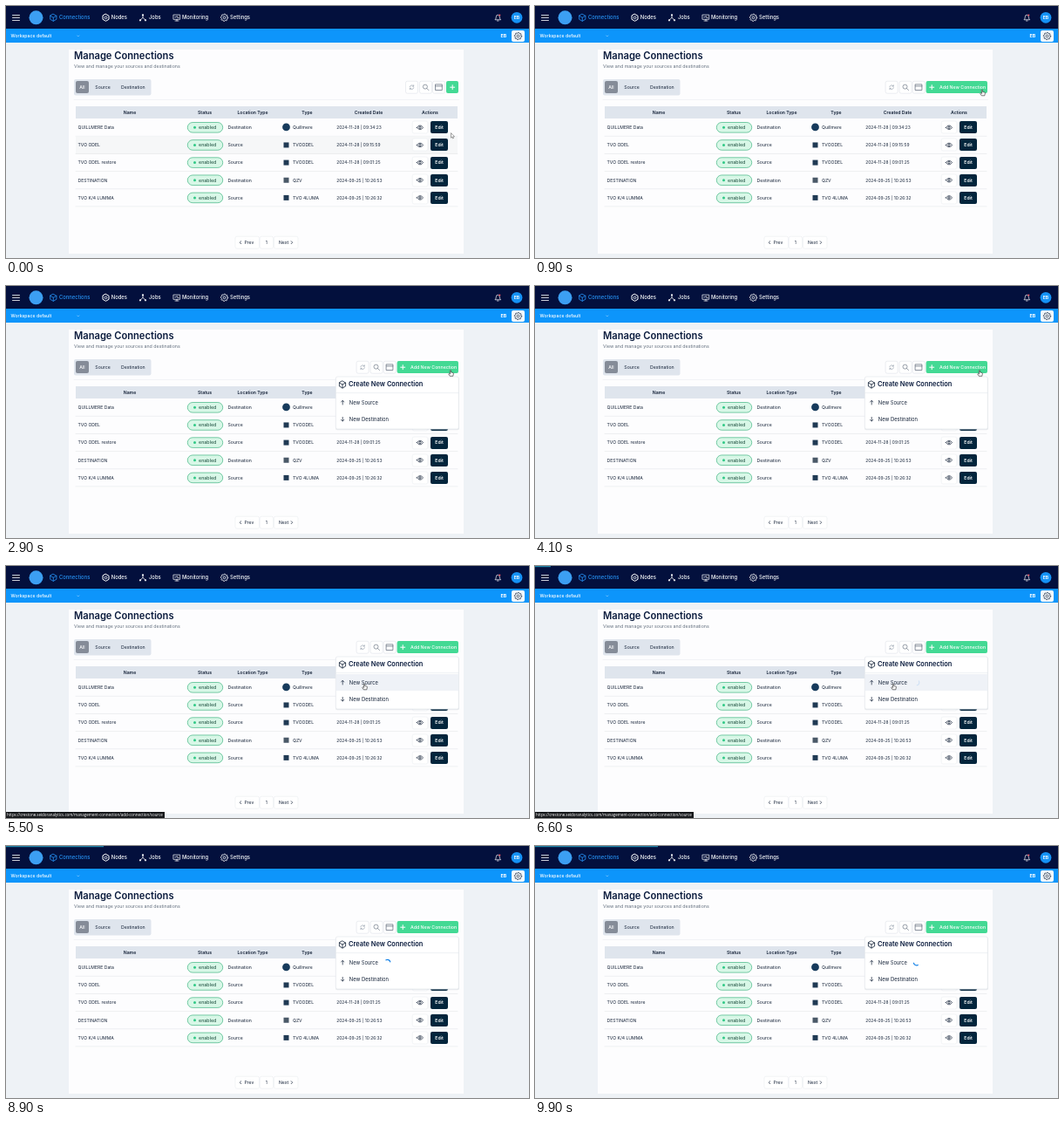
Recreate the animation shown at these times as an HTML page. Size 600 by 289 pixels, loop 10 s.

```html
<!DOCTYPE html>
<html lang="en">
<head>
<meta charset="utf-8">
<title>Manage Connections</title>
<style>
  html, body { margin: 0; width: 100%; height: 100%; overflow: hidden; background: #eef2f6; }
  svg { display: block; width: 100vw; height: 100vh; font-family: Inter, "Open Sans", sans-serif; }
</style>
</head>
<body>
<svg id="stage" viewBox="0 0 600 289"></svg>
<script>
const LOOP = 10000, STEP = 100;
const NAVY = '#03103d', INK = '#142238', GREEN = '#43d994';

const text = (x, y, str, size = 5.2, fill = INK, weight = 400, anchor = 'start') =>
  `<text x="${x}" y="${y}" font-size="${size}" fill="${fill}" font-weight="${weight}" text-anchor="${anchor}">${str}</text>`;
const box = (x, y, w, h, fill, r = 0, stroke = 'none', extra = '') =>
  `<rect x="${x}" y="${y}" width="${w}" height="${h}" rx="${r}" fill="${fill}" stroke="${stroke}" stroke-width=".7" ${extra}/>`;
const path = (d, stroke = INK, width = .8, fill = 'none') =>
  `<path d="${d}" stroke="${stroke}" stroke-width="${width}" fill="${fill}" stroke-linecap="round" stroke-linejoin="round"/>`;
const dot = (x, y, r, fill, stroke = 'none', width = .8) =>
  `<circle cx="${x}" cy="${y}" r="${r}" fill="${fill}" stroke="${stroke}" stroke-width="${width}"/>`;
const group = (content, attrs = '') => `<g ${attrs}>${content}</g>`;
const at = (x, y, content) => group(content, `transform="translate(${x} ${y})"`);

const cube = color => path('M0-4 3.6-2V2L0 4-3.6 2V-2ZM-3.6-2 0 0 3.6-2M0 0V4', color);
const gear = color => {
  let d = '';
  for (let i = 0; i < 32; i++) {
    const angle = i * Math.PI / 16, r = i % 4 < 2 ? 4.2 : 3.3;
    d += `${i ? 'L' : 'M'}${(r * Math.cos(angle)).toFixed(2)} ${(r * Math.sin(angle)).toFixed(2)}`;
  }
  return path(d + 'Z', color) + dot(0, 0, 1.4, 'none', color);
};
const hexNut = color => path('M0-4 3.5-2V2L0 4-3.5 2V-2Z', color, 1) + dot(0, 0, 1.4, 'none', color);
const branch = color => path('M0-2V0L-3 3M0 0 3 3', color) +
  [[0, -3], [-3, 3], [3, 3]].map(([x, y]) => dot(x, y, 1.1, color)).join('');
const monitor = color => path('M-3.7-3.2H3.7V2H-3.7ZM-2 3.7H2M0 2V3.7M-2.2-.5H-1L0-1.7 1 .3H2.2', color, .7);
const windowIcon = path('M-3.7-3.3H3.7V3.3H-3.7ZM-3.7-1.3H3.7', '#566273', .7);
const search = dot(-.6, -.6, 2.5, 'none', '#6b7684', .7) + path('M1.3 1.3 3.4 3.4', '#6b7684', .7);
const refresh = path('M-2.3-.5A2.4 2.4 0 0 1 2-1.3M2.2-2.5V-1.1H.8M2.3.5A2.4 2.4 0 0 1-2 1.3M-2.2 2.5V1.1H-.8', '#9aa4b1', .7);
const eye = path('M-3.6 0Q0-4.8 3.6 0Q0 4.8-3.6 0Z', INK, .7) + dot(0, 0, 1.2, 'none', INK, .8);
const plus = path('M-2.5 0H2.5M0-2.5V2.5', '#fff', 1);

function navigation() {
  const items = [
    [54.3, 61, 'Connections', cube, '#2794f6'], [114.5, 120.8, 'Nodes', hexNut, '#fff'],
    [157, 164, 'Jobs', branch, '#fff'], [196, 202, 'Monitoring', monitor, '#fff'],
    [250.5, 257, 'Settings', gear, '#fff']
  ];
  return box(0, 0, 600, 26, NAVY) + path('M7.5 10.5H15.5M7.5 13.5H15.5M7.5 16.5H15.5', '#fff', .8) +
    dot(34.5, 13.3, 8, '#3c9ff2') +
    items.map(([ix, tx, label, icon, color]) => at(ix, 13.3, icon(color)) + text(tx, 15.4, label, 5.85, color, 500)).join('') +
    path('M561.3 15.5Q562.3 14.5 562.3 12.5A2 2.3 0 0 1 566.3 12.5Q566.3 14.5 567.3 15.5ZM563.5 17H565.1', '#fff', .7) +
    dot(566.3, 10.5, 1.1, '#f0525f') +
    dot(586, 13.3, 6.4, '#1592f5') + text(586, 15.2, 'EB', 5.2, '#fff', 600, 'middle') +
    box(0, 26, 600, 16, '#0d95fb') + text(5.5, 36.2, 'Workspace default', 5.2, '#fff', 500) +
    path('M81.7 33.9 82.8 35 83.9 33.9', '#a9d8ff', .6) +
    text(571, 36.3, 'EB', 5.4, '#fff', 700, 'middle') +
    box(580, 28, 15, 13, '#f4f8fc', 2) + at(587.5, 34.5, gear('#26344a'));
}

function tableRow([name, place, type, date, mark], i) {
  const y = 139.3 + i * 20.15, base = y + 1.8, top = Math.round(y - 7);
  const logo = i ? box(318.5, y - 3, 6, 6, mark) : dot(321.5, y - .4, 4.4, mark);
  return (i === 1 ? box(80, y - 10, 438, 20.1, '#f6f7f8', 0, 'none', 'id="rowHover"') : '') +
    text(82.5, base, name, 5.1) +
    box(208.3, y - 5.8, 40.4, 11.6, '#d8f7e7', 5.8, '#3fb582') + dot(216.5, y, 1.5, '#2fc985') +
    text(221, base, 'enabled', 5.4, '#17493a') +
    text(254.5, base, place, 5.15) + logo + text(329, base - (i ? 0 : .6), type, 5.1) +
    text(379.3, base, date, 4.85) +
    box(466.2, top, 17.6, 14, '#fff', 2, '#edf0f3') + at(475, y, eye) +
    box(487, top, 20, 14, '#03253c', 2) + text(497, base, 'Edit', 5.1, '#fff', 600, 'middle') +
    path(`M80 ${y + 10}H518`, '#e3e6ea', .6);
}

function table() {
  const heads = [[142, 'Name'], [228, 'Status'], [283, 'Location Type'], [345.5, 'Type'], [416, 'Created Date'], [486.5, 'Actions']];
  const rows = [
    ['QUILLMERE Data', 'Destination', 'Quillmere', '2024-11-28 | 09:34:23', '#173b5c'],
    ['TVO ODEL', 'Source', 'TVOODEL', '2024-11-28 | 09:15:59', '#203a54'],
    ['TVO ODEL restore', 'Source', 'TVOODEL', '2024-11-28 | 09:01:25', '#203a54'],
    ['DESTINATION', 'Destination', 'QZV', '2024-09-25 | 10:26:53', '#4a5968'],
    ['TVO K/4 LUMMA', 'Source', 'TVO 4LUMA', '2024-09-25 | 10:26:32', '#203a54']
  ];
  return box(80, 115, 438, 14, '#dfe5ed') +
    heads.map(([x, label]) => text(x, 123.6, label, 5.15, INK, 600, 'middle')).join('') +
    rows.map(tableRow).join('');
}

function panel() {
  const pages = [[263, 27.5], [291.3, 15.2], [307.5, 27.5]];
  return box(72, 50, 453, 234, '#fdfdfe') +
    text(78, 61.4, 'Manage Connections', 11.15, '#0a1b3d', 600) +
    text(78, 71, 'View and manage your sources and destinations', 5.32, '#64707f') +
    box(78, 84, 88.5, 18.5, '#dfe5ed', 2) + box(80, 86, 15, 14, '#858c98', 2) +
    text(87.4, 95.1, 'All', 5.2, '#fff', 500, 'middle') +
    text(111, 95.1, 'Source', 5.2, INK, 400, 'middle') +
    text(145.8, 95.1, 'Destination', 5.2, INK, 400, 'middle') +
    path('M78 107.5H519.5', '#e6e9ed', .5) + table() +
    pages.map(([x, w]) => box(x, 264.2, w, 14, '#fff', 2, '#edeff2')).join('') +
    path('M269.7 269.7 268.2 271.2 269.7 272.7M327.2 269.7 328.7 271.2 327.2 272.7', INK, .7) +
    text(273.5, 273.1, 'Prev', 5.1) + text(298.8, 273.1, '1', 5.1, INK, 400, 'middle') + text(313, 273.1, 'Next', 5.1);
}

function toolbar() {
  const tools = [[465.5, refresh], [481.5, search], [496.6, windowIcon]];
  return group(tools.map(([x, icon]) => box(x - 7, 86.2, 14, 14, '#fff', 2, '#e3e6eb') + at(x, 93.2, icon)).join(''), 'id="tools"') +
    box(505, 86, 14, 14, GREEN, 2, 'none', 'id="addButton"') +
    group(plus, 'id="addPlus"') + group(text(464, 95.1, 'Add New Connection', 5.25, '#fff', 500), 'id="addLabel"');
}

const menu = () => group(
  box(378, 104.6, 142, 60.6, '#8794a3', 2, 'none', 'opacity=".18"') +
  box(378.3, 104, 141, 60, '#fff', 2, '#e4e8ed') +
  at(386, 113, cube(INK)) + text(393, 115.4, 'Create New Connection', 7.45, '#0a1b3d', 600) +
  path('M378.5 122.6H519', '#e3e7ec', .6) +
  box(379, 124, 140, 19, '#eff2f7', 0, 'none', 'id="itemHover"') +
  path('M386.2 136V131.4M384.6 133 386.2 131.4 387.8 133M386.2 150.4V155M384.6 153.4 386.2 155 387.8 153.4', INK, .7) +
  text(393.8, 135.6, 'New Source', 5.75) + text(393.8, 154.8, 'New Destination', 5.85) +
  group(path('M-.6-3.2A3.3 3.3 0 0 1 3.2 .5', '#1482e8', 1.2), 'id="spinner"'), 'id="menu"');

const overlays = () =>
  box(0, 0, 0, 1.2, '#1f84a8', 0, 'none', 'id="progress"') +
  group(box(0, 282, 182, 7, '#16181b') +
    `<text x="1" y="287.2" font-size="4.46" fill="#fff" font-family="Open Sans, sans-serif">https://crestone.seidoranalytics.com/management-connection/add-connection/source</text>`, 'id="status"') +
  group(
    group(path('M0 0V5.2L1.2 4.1 2.1 6 2.9 5.6 2.1 3.8H3.6Z', '#444', .5, '#fff'), 'id="arrow"') +
    group(path('M-.6 .3Q0-.5 .6 .3V2.5L2.8 3Q3.5 3.2 3.4 4L2.8 6.8H-.7L-2.3 4.4Q-2.2 3.3-.6 4.2Z', '#222', .6, '#fff'), 'id="hand"'), 'id="cursor"');

document.getElementById('stage').innerHTML = navigation() + panel() + toolbar() + menu() + overlays();
const el = Object.fromEntries([...document.querySelectorAll('[id]')].map(node => [node.id, node]));

const clamp = v => Math.max(0, Math.min(1, v));
const ease = v => v * v * (3 - 2 * v);
// Interpolates between [time, value] points.
function track(points, t, curve = v => v) {
  const next = points.findIndex(([time]) => time > t);
  if (next < 0) return points[points.length - 1][1];
  if (next === 0) return points[0][1];
  const [t0, a] = points[next - 1], [t1, b] = points[next];
  return a + (b - a) * curve((t - t0) / (t1 - t0));
}

const cursorX = [[100, 510.5], [700, 513], [1700, 513], [2600, 510], [4500, 510], [5300, 411], [7300, 411], [8000, 362.6], [8100, 362.6], [8600, 352]];
const cursorY = [[100, 146], [700, 96], [1700, 96], [2600, 96.5], [4500, 96.5], [5300, 135], [7300, 135], [8000, 60.5], [8100, 60.5], [8600, -8]];
const loading = [[6300, 0], [6600, 18], [8100, 89], [9900, 141]];

const show = (node, opacity) => node.setAttribute('opacity', Number(opacity));
const move = (node, x, y, turn = 0) => node.setAttribute('transform', `translate(${x} ${y}) rotate(${turn})`);

function render(t) {
  const x = track(cursorX, t, ease), y = track(cursorY, t, ease);
  const open = ease(clamp((t - 500) / 300)), shift = 56.4 * open;
  const overItem = t >= 5000 && y > 123 && x < 480;
  const hand = t >= 500 && t < 4700 || overItem;

  move(el.cursor, x, y);
  show(el.cursor, t < 8600);
  show(el.hand, hand);
  show(el.arrow, !hand);
  show(el.rowHover, t < 500 && y > 139);

  move(el.tools, -shift, 0);
  el.addButton.setAttribute('x', 505 - shift);
  el.addButton.setAttribute('width', 14 + shift);
  move(el.addPlus, 512.2 - shift * 1.01, 93.2);
  show(el.addLabel, clamp(open * 3 - 2));

  show(el.menu, t >= 1000);
  show(el.itemHover, overItem);
  show(el.status, clamp((t - 5000) / 200) * clamp((8300 - t) / 500));

  show(el.spinner, clamp((t - 6560) / 300));
  move(el.spinner, 437.6, 133.6, (t - 8100) / 400 * 360 - 20);
  el.progress.setAttribute('width', track(loading, t));
}

const start = performance.now();
function tick() {
  const t = (performance.now() - start) % LOOP;
  render(Math.floor(t / STEP) * STEP);
  requestAnimationFrame(tick);
}
tick();
</script>
</body>
</html>
```
